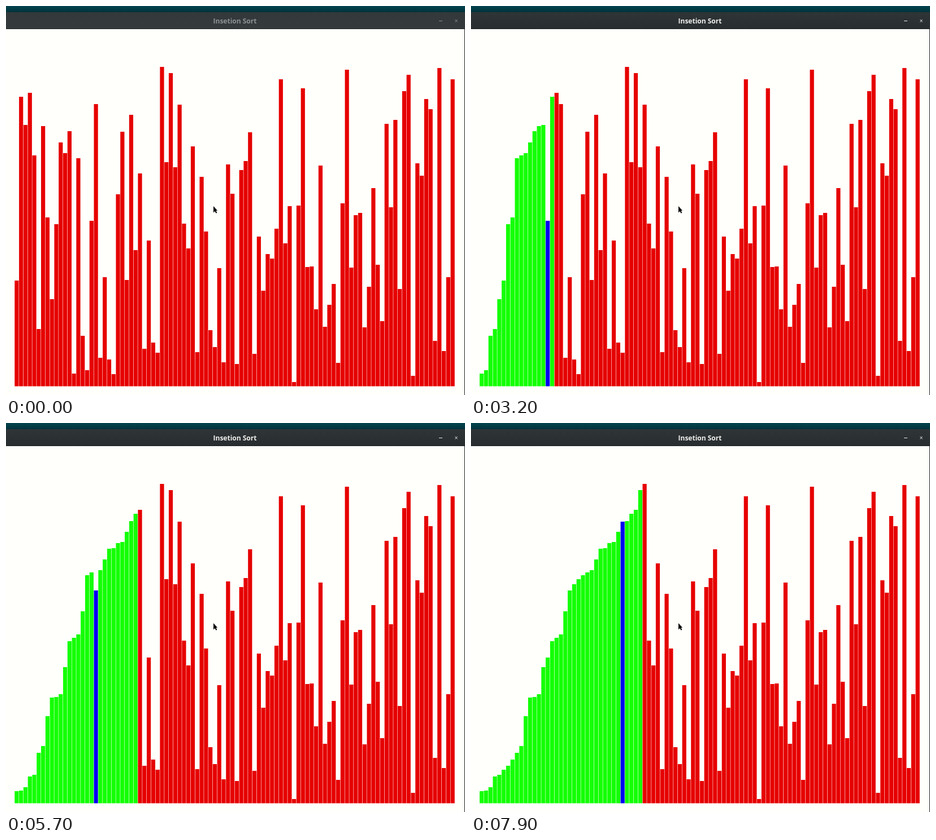
Write an HTML page with a canvas that moves like this. It is 812x690 px and loops after 8 s.

```html
<!DOCTYPE html>
<html lang="en">
<head>
<meta charset="utf-8">
<title>Insetion Sort</title>
<style>
  html, body { margin: 0; width: 100%; height: 100%; overflow: hidden; background: #fffffc; }
  canvas { display: block; }
</style>
</head>
<body>
<canvas id="stage" width="812" height="690"></canvas>
<script>
const ctx = document.getElementById('stage').getContext('2d');
const LOOP = 8000, TICK = 100, FOCUS_TIME = 900;
const LEFT = 15.3, PITCH = 7.79, BAR_WIDTH = 7.2, BASE = 674.5;

// Top edge of each bar before sorting
const TOPS = [
  487, 161, 211, 154, 265, 573, 213, 375, 520, 387, 242, 261, 222, 652, 270, 585, 646, 381, 174, 624,
  481, 627, 653, 334, 223, 486, 193, 433, 297, 608, 416, 597, 615, 108, 277, 119, 286, 175, 386, 430,
  249, 614, 303, 400, 575, 605, 465, 632, 281, 333, 635, 291, 275, 224, 617, 409, 505, 440, 448, 395,
  130, 421, 355, 667, 354, 146, 463, 462, 538, 283, 569, 530, 493, 633, 350, 113, 464, 371, 367, 570,
  498, 323, 459, 559, 209, 357, 202, 502, 151, 122, 656, 279, 301, 165, 183, 594, 110, 612, 481, 130
];

// [time, sorting steps done]
const PACE = [[1350, 0], [1800, 27], [3200, 112], [4200, 176], [4900, 217], [5700, 265], [6600, 322], [7900, 403]];

function stepsAt(time) {
  if (time < PACE[0][0]) return 0;
  const next = Math.max(1, PACE.findIndex(([t]) => t >= time));
  const [t0, n0] = PACE[next - 1], [t1, n1] = PACE[next];
  return Math.round(n0 + (n1 - n0) * (time - t0) / (t1 - t0));
}

// One step opens each pass, then one step per swap
function sortFor(steps) {
  const tops = [...TOPS];
  let pass = 0, active = -1;
  while (steps-- > 0) {
    const j = active < 0 ? pass : active;
    if (pass > 0 && j > 0 && tops[j - 1] < tops[j]) {
      [tops[j - 1], tops[j]] = [tops[j], tops[j - 1]];
      active = j - 1;
    } else {
      pass++;
      active = -1;
    }
  }
  return { tops, pass, active };
}

function fillBand(y, height, from, to) {
  const gradient = ctx.createLinearGradient(0, y, 0, y + height);
  gradient.addColorStop(0, from);
  gradient.addColorStop(1, to);
  ctx.fillStyle = gradient;
  ctx.fillRect(0, y, 812, height);
}

function drawWindow(focused) {
  ctx.fillStyle = '#fffffc';
  ctx.fillRect(0, 0, 812, 690);
  fillBand(0, 11, '#03444f', '#02323c');
  if (focused) fillBand(11, 30, '#2f3537', '#282d2f');
  else fillBand(11, 30, '#33393b', '#353a3c');
  ctx.fillStyle = '#1d2223';
  ctx.fillRect(0, 40, 812, 1);
  ctx.fillRect(811, 41, 1, 649);

  ctx.fillStyle = ctx.strokeStyle = focused ? '#f0f0ee' : '#8d9192';
  ctx.font = 'bold 12px "Open Sans", "Noto Sans", sans-serif';
  ctx.textAlign = 'center';
  ctx.fillText('Insetion Sort', 405, 31);
  ctx.lineWidth = 1;
  ctx.stroke(new Path2D('M766 26.5h6M794.5 24l4 4.5M798.5 24l-4 4.5'));
}

function drawBars({ tops, pass, active }) {
  tops.forEach((top, i) => {
    ctx.fillStyle = i === active ? '#0000f0' : i < pass ? '#14ff05' : '#e60000';
    ctx.fillRect(LEFT + PITCH * i, top, BAR_WIDTH, BASE - top);
  });
}

const pointer = new Path2D('M367 355v11.5l2.6-2.4 1.9 3.6 1.8-.9-1.8-3.8h2.5z');

function draw(now) {
  const time = Math.floor(now % LOOP / TICK) * TICK;
  drawWindow(time >= FOCUS_TIME);
  drawBars(sortFor(stepsAt(time)));
  ctx.fillStyle = '#000';
  ctx.fill(pointer);
  requestAnimationFrame(draw);
}
draw(performance.now());
</script>
</body>
</html>
```
